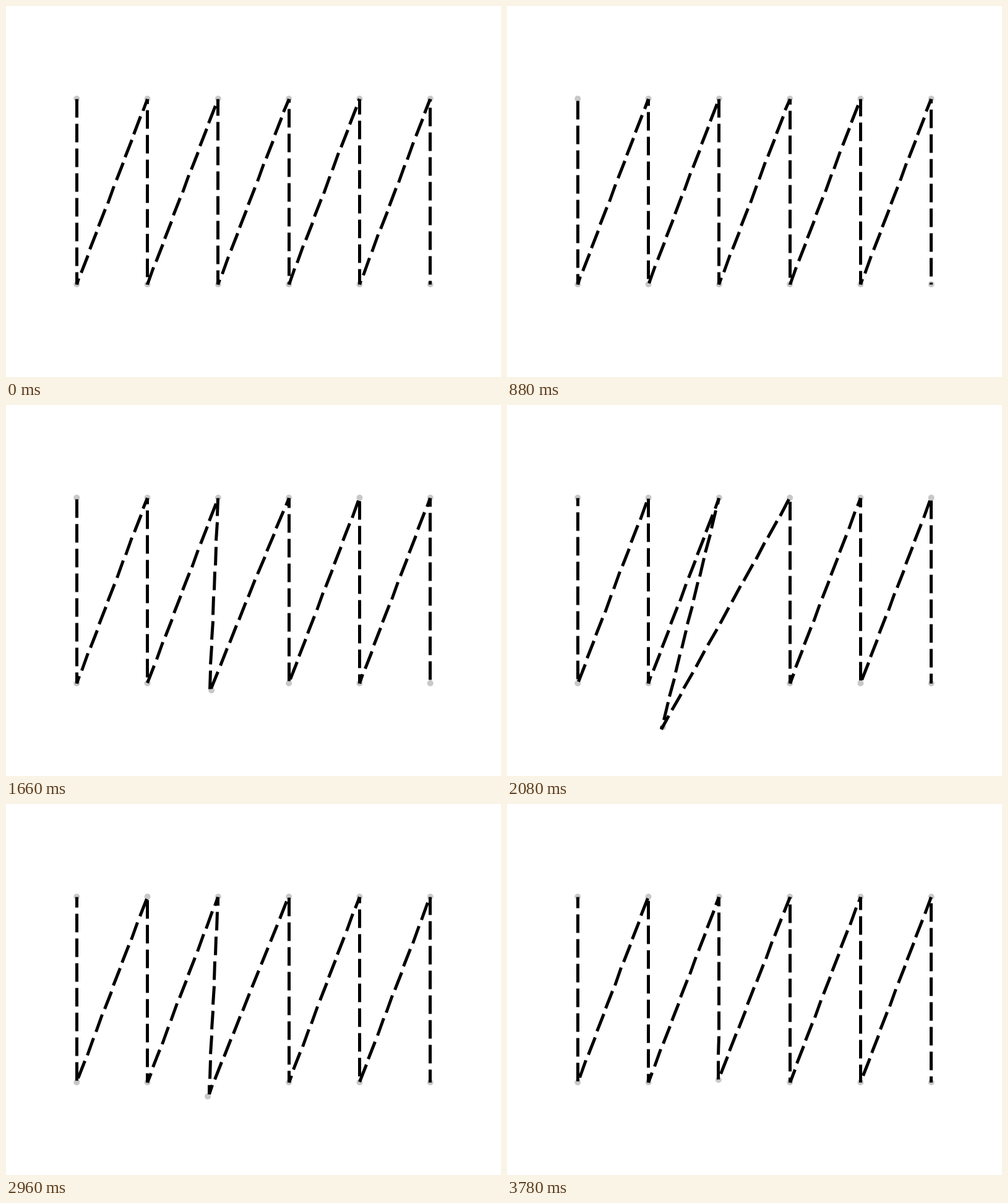
Write an HTML page with a canvas that moves like this. It is 800 px wide and 600 px high and loops after 3800 ms.

```html
<!DOCTYPE html>
<html lang="en">
<head>
<meta charset="utf-8">
<title>Dashed zigzag</title>
<style>
  html, body { margin: 0; width: 100%; height: 100%; overflow: hidden; background: #fff; }
  canvas { display: block; }
</style>
</head>
<body>
<canvas id="stage" width="800" height="600"></canvas>
<script>
const ctx = document.getElementById('stage').getContext('2d');
const LOOP = 3800, STEP = 20, DASH = 30, PERIOD = 40, DRAGGED = 5;

// Zigzag of six columns, a top and a bottom point in each
const points = Array.from({ length: 12 }, (_, i) =>
  [800 / 7 * (1 + (i >> 1)), i % 2 ? 450 : 150]);

// Key poses of the dragged point; a spline fills in between
const drag = [
  { t: 1500, p: points[DRAGGED] },
  { t: 1660, p: [329, 464] },
  { t: 2080, p: [249.5, 524.5] },
  { t: 2340, p: [249, 582.5] },
  { t: 2580, p: [288, 551] },
  { t: 2960, p: [328, 469] },
  { t: 3140, p: [341.8, 446] }
];

// Velocity at key i, zero at both ends
function velocity(i, axis) {
  const a = drag[i - 1], b = drag[i + 1];
  return a && b ? (b.p[axis] - a.p[axis]) / (b.t - a.t) : 0;
}

function dragAt(t) {
  const j = drag.findIndex(k => k.t > t), i = j - 1;
  if (j === 0) return drag[0].p;
  if (j < 0) return drag[drag.length - 1].p;
  const a = drag[i], b = drag[j], span = b.t - a.t;
  const u = (t - a.t) / span, v = 1 - u;
  return [0, 1].map(n =>
    v * v * (1 + 2 * u) * a.p[n] + u * u * (1 + 2 * v) * b.p[n] +
    u * v * span * (v * velocity(i, n) - u * velocity(j, n)));
}

function dot([x, y]) {
  ctx.beginPath();
  ctx.arc(x, y, 5, 0, Math.PI * 2);
  ctx.fill();
}

// Stroke ends sit on pixel centres
const snap = v => Math.floor(v + 1e-6) + 0.5;

// Dashes run on around the corners, each side drawn as its own stroke
function dashedPath(pts, phase) {
  let start = 0;
  ctx.beginPath();
  for (let i = 1; i < pts.length; i++) {
    const [x, y] = pts[i - 1];
    const dx = pts[i][0] - x, dy = pts[i][1] - y;
    const len = Math.hypot(dx, dy), end = start + len;
    let s = Math.floor((start - phase) / PERIOD) * PERIOD + phase;
    for (; s < end; s += PERIOD) {
      const from = Math.max(s, start), to = Math.min(s + DASH, end);
      if (to <= from) continue;
      const a = (from - start) / len, b = (to - start) / len;
      ctx.moveTo(snap(x + dx * a), snap(y + dy * a));
      ctx.lineTo(snap(x + dx * b), snap(y + dy * b));
    }
    start = end;
  }
  ctx.stroke();
}

function draw(time) {
  const tick = Math.floor(time % LOOP / STEP), t = tick * STEP;
  ctx.clearRect(0, 0, 800, 600);

  // The handle trails the line by one step
  ctx.fillStyle = '#c8c8c8';
  points.forEach((p, i) => dot(i === DRAGGED ? dragAt(t - STEP) : p));

  ctx.lineWidth = 5;
  const pts = points.slice();
  pts[DRAGGED] = dragAt(t);
  dashedPath(pts, Math.max(0, tick - 1) % PERIOD);
}

function frame(now) {
  draw(now);
  requestAnimationFrame(frame);
}
draw(0);
requestAnimationFrame(frame);
</script>
</body>
</html>
```
